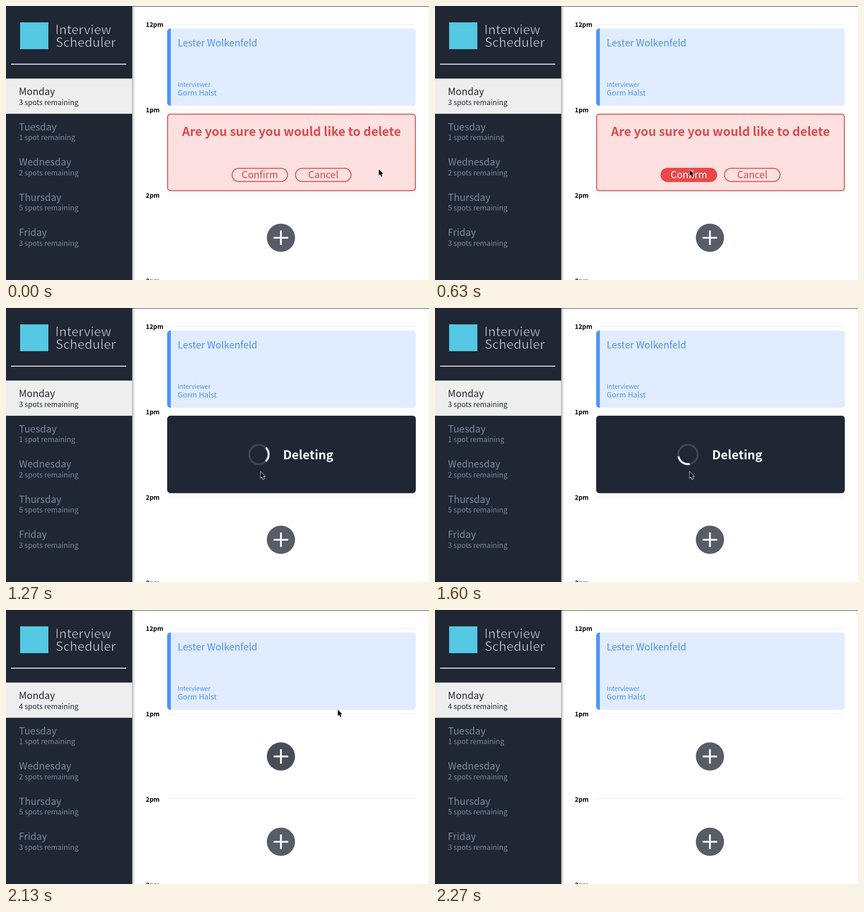
These frames come from a looping animation (929x603 px, 3060 ms). An HTML page:

```html
<!DOCTYPE html>
<html lang="en">
<head>
<meta charset="utf-8">
<title>Interview Scheduler</title>
<style>
html, body { margin: 0; width: 100%; height: 100%; overflow: hidden; background: #fff; }
svg { display: block; width: 929px; height: 603px; }
text { font-family: "Noto Sans CJK JP", "Noto Sans CJK SC", "Noto Sans CJK", "Noto Sans", sans-serif; }

/* a thin outline in the background colour lightens the strokes */
.brand { font-size: 28px; font-weight: 300; fill: #cdd1d7; stroke: #1f2735; stroke-width: .7px; }
.day { font-size: 21.3px; }
.spots { font-size: 15.8px; font-weight: 300; }
.time { font-size: 13.8px; font-weight: 700; }
.big { font-size: 26.7px; font-weight: 700; }
.btn { font-size: 21.3px; text-anchor: middle; fill: #df4a4a; }
.btn rect { fill: none; stroke: #df4a4a; stroke-width: 2; }
.btn .on rect { fill: #e94848; stroke: #e94848; }
.btn .on text { fill: #fff; }
.add { opacity: .75; }

.on, .step { animation: 3060ms step-end infinite; }
.ask { animation-name: ask; }
.load { animation-name: load; }
.done { animation-name: done; }
.before { animation-name: before; }
.cancel { animation-name: cancel; }
.confirm { animation-name: confirm; }
.spin { animation: spin 3060ms linear infinite; }
.glow { animation: glow 3060ms linear infinite; }
.cursor { animation: move 3060ms linear infinite; }

@keyframes ask { 0% { opacity: 1; } 21.895%, 100% { opacity: 0; } }
@keyframes load { 0% { opacity: 0; } 21.895% { opacity: 1; } 54.575%, 100% { opacity: 0; } }
@keyframes before { 0% { opacity: 1; } 54.575%, 100% { opacity: 0; } }
@keyframes done { 0% { opacity: 0; } 54.575%, 100% { opacity: 1; } }
@keyframes cancel { 0% { opacity: 0; } 6.37% { opacity: 1; } 11.11%, 100% { opacity: 0; } }
@keyframes confirm { 0% { opacity: 0; } 11.93%, 100% { opacity: 1; } }
@keyframes spin { from { transform: rotate(-296.25deg); } to { transform: rotate(851.25deg); } }
@keyframes glow {
  0%, 67% { opacity: .75; }
  68.3%, 70.8% { opacity: .82; }
  74.18%, 100% { opacity: .75; }
}
@keyframes move {
  0% { transform: translate(818px, 358.5px); }
  .98% { transform: translate(818px, 358.5px); animation-timing-function: ease-in-out; }
  17.32%, 54.575% { transform: translate(558.5px, 359.5px); }
  54.576% { transform: translate(557.5px, 358.5px); }
  65.4% { transform: translate(557.5px, 358.5px); animation-timing-function: ease-in; }
  69.6%, 70.8% { transform: translate(728px, 218.5px); }
  72.9%, 100% { transform: translate(940px, 34px); }
}
</style>
</head>
<body>
<svg viewBox="0 0 929 603">
  <defs>
    <linearGradient id="shade">
      <stop offset="0" stop-color="#000" stop-opacity=".36"/>
      <stop offset=".4" stop-color="#000" stop-opacity=".13"/>
      <stop offset="1" stop-color="#000" stop-opacity="0"/>
    </linearGradient>
    <g id="plus">
      <circle r="31" fill="#1f2735"/>
      <path d="M-16 0H16M0-16V16" stroke="#fff" stroke-width="4"/>
    </g>
  </defs>

  <rect width="929" height="603" fill="#fff"/>

  <!-- sidebar -->
  <rect x="277" width="7" height="603" fill="url(#shade)"/>
  <rect width="277" height="603" fill="#1f2735"/>
  <rect x="31" y="36" width="62" height="59" fill="#55c8e4"/>
  <text class="brand" x="108.3" y="62">Interview</text>
  <text class="brand" x="109" y="90">Scheduler</text>
  <rect x="11" y="127" width="253" height="2" fill="#eef3f2"/>
  <rect y="159.7" width="277" height="77.5" fill="#eee"/>

  <g fill="#1f2735">
    <text class="day" x="28.2" y="196.3">Monday</text>
    <g class="spots">
      <text class="step before" x="28.5" y="217.8">3 spots remaining</text>
      <text class="step done" x="28.5" y="217.8">4 spots remaining</text>
    </g>
  </g>
  <g fill="#7a8898">
    <g class="day">
      <text x="28.5" y="273.8">Tuesday</text>
      <text x="28.5" y="351.3">Wednesday</text>
      <text x="28.5" y="428.8">Thursday</text>
      <text x="28.2" y="506.3">Friday</text>
    </g>
    <g class="spots">
      <text x="28.5" y="295.3">1 spot remaining</text>
      <text x="28.5" y="372.8">2 spots remaining</text>
      <text x="28.5" y="450.3">5 spots remaining</text>
      <text x="28.5" y="527.8">3 spots remaining</text>
    </g>
  </g>

  <!-- schedule -->
  <g class="time">
    <text x="307" y="46.3">12pm</text>
    <text x="307" y="234.2">1pm</text>
    <text x="307" y="422">2pm</text>
    <text x="307" y="609.5">3pm</text>
  </g>
  <path d="M360 40.5H900M354 228.5H900M354 415.5H900" stroke="#ebebeb"/>

  <rect x="354" y="49.5" width="546" height="170" rx="7" fill="#e1ecff"/>
  <path d="M362 49.5h-1a7 7 0 0 0-7 7v156a7 7 0 0 0 7 7h1z" fill="#4b96fb"/>
  <g fill="#4a92f3">
    <text x="377" y="89" font-size="21.1">Lester Wolkenfeld</text>
    <text x="377" y="178" font-size="13.5" font-weight="300">Interviewer</text>
    <text x="377" y="197.3" font-size="16.4">Gorm Halst</text>
  </g>

  <g transform="translate(603.8 510)"><use class="add" href="#plus"/></g>
  <g class="step done">
    <g transform="translate(603.8 322.3)"><use class="add glow" href="#plus"/></g>
  </g>

  <!-- delete prompt -->
  <g class="step ask">
    <rect x="355" y="238" width="544" height="168.5" rx="6" fill="#fde0e0" stroke="#df4a4a" stroke-width="2"/>
    <text class="big" x="627" y="285.5" text-anchor="middle" fill="#df4a4a">Are you sure you would like to delete</text>
    <g class="btn" transform="translate(557.5 371.8)">
      <rect x="-61" y="-14.5" width="122" height="29" rx="14.5"/>
      <text y="7.5">Confirm</text>
      <g class="on confirm">
        <rect x="-61" y="-14.5" width="122" height="29" rx="14.5"/>
        <text y="7.5">Confirm</text>
      </g>
    </g>
    <g class="btn" transform="translate(696.8 371.8)">
      <rect x="-61" y="-14.5" width="122" height="29" rx="14.5"/>
      <text y="7.5">Cancel</text>
      <g class="on cancel">
        <rect x="-61" y="-14.5" width="122" height="29" rx="14.5"/>
        <text y="7.5">Cancel</text>
      </g>
    </g>
  </g>

  <!-- progress -->
  <g class="step load">
    <rect x="354" y="237" width="546" height="170.5" rx="7" fill="#1f2735"/>
    <g transform="translate(555.5 322.3)" fill="none" stroke-width="4.4">
      <circle r="21.3" stroke="#3c4452"/>
      <path class="spin" d="M-15.06 15.06A21.3 21.3 0 0 1-15.06-15.06" stroke="#f1f2f4"/>
    </g>
    <text class="big" x="608.5" y="332.7" fill="#fff">Deleting</text>
  </g>

  <rect width="929" height="1" fill="#1d1f23"/>
  <path class="cursor" d="M.8 .8V14.6L3.8 11.8L6.2 17L8.6 15.9L6.3 11H10.4Z" fill="#000" stroke="#fff" stroke-width="1.8" stroke-linejoin="round" paint-order="stroke"/>
</svg>
</body>
</html>
```
